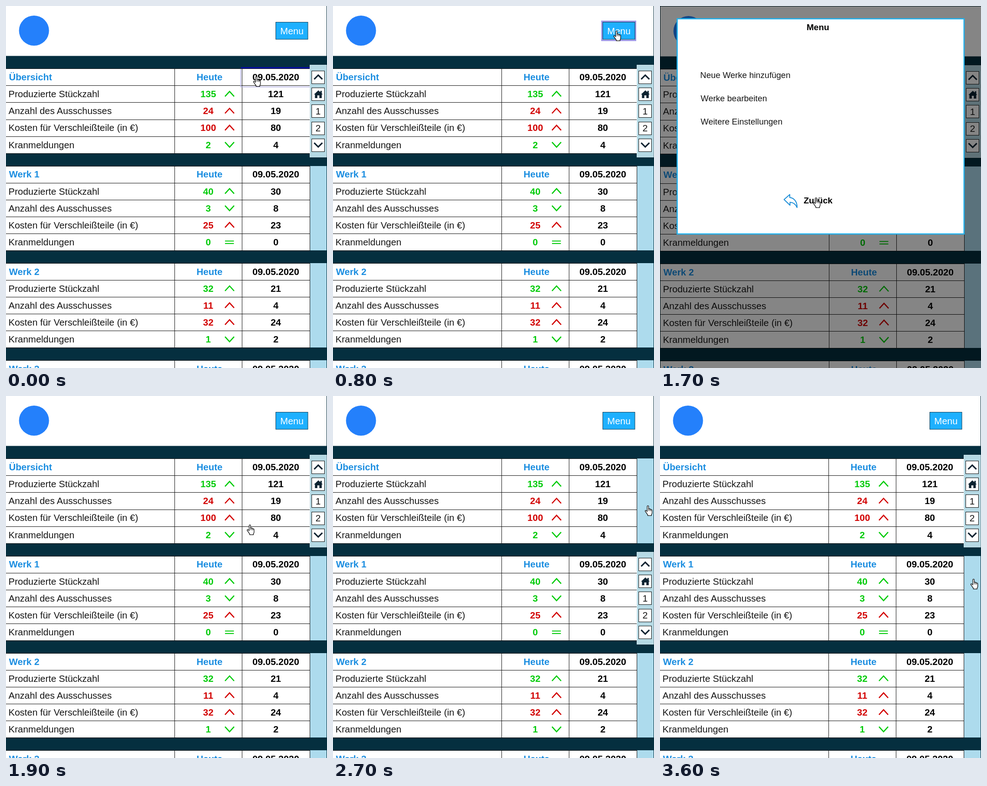
Recreate the animation shown at these times as an HTML page. Size 705 by 794 pixels, loop 3.7 s.

```html
<!DOCTYPE html>
<html lang="de">
<head>
<meta charset="utf-8">
<title>Produktionsübersicht</title>
<style>
html, body { margin: 0; width: 100%; height: 100%; overflow: hidden; background: #052f3f; }
svg { display: block; width: 705px; height: 794px; font: 20.5px "Liberation Sans", Arial, sans-serif; fill: #161616; }
.b { font-weight: bold; fill: #000; }
.mid { text-anchor: middle; }
.head { font-weight: bold; fill: #1a8de0; }
.good { font-weight: bold; fill: #00cb08; }
.bad { font-weight: bold; fill: #d20000; }
.icon { fill: none; stroke-width: 2.5; }
.equal { stroke-width: 2; }
.icon.good { stroke: #00cb08; }
.icon.bad { stroke: #d20000; }
.key { fill: #fff; stroke: #111; }
.arrow { fill: none; stroke: #0b2230; stroke-width: 3.2; }

#page, #nav, #cursor, #modal, .focus { animation: 3.7s step-end infinite; }
#page { animation-name: page; }
#modal { animation-name: modal; visibility: hidden; }
#nav { animation-name: nav; }
#cursor { animation-name: cursor; }
.focus { visibility: hidden; }
#dateFocus { animation-name: date; }
#menuFocus { animation-name: menu; }
#homeFocus { animation-name: home; }

@keyframes page {
  0%, 51.35%, 100% { transform: none; }
  24.32% { transform: translate(1px, 1px); }
}
@keyframes modal {
  0%, 51.35%, 100% { visibility: hidden; }
  24.32% { visibility: visible; }
}
@keyframes nav {
  0%, 89.18%, 100% { transform: none; }
  64.86% { transform: translateY(213px); }
}
@keyframes date {
  0% { visibility: visible; }
  8.1%, 100% { visibility: hidden; }
}
@keyframes menu {
  0%, 24.32%, 100% { visibility: hidden; }
  21.62% { visibility: visible; }
}
@keyframes home {
  0%, 89.18%, 100% { visibility: hidden; }
  86.48% { visibility: visible; }
}
/* The pointer advances in 100 ms steps */
@keyframes cursor {
  0% { transform: translate(543px, 154px); }
  5.4% { transform: translate(543px, 154px); animation-timing-function: steps(6); }
  21.62% { transform: translate(616px, 54px); }
  24.32% { transform: translate(616px, 54px); animation-timing-function: steps(4); }
  35.13% { transform: translate(315px, 388px); animation-timing-function: steps(2); }
  40.54% { transform: translate(336px, 420px); }
  45.94% { transform: translate(336px, 420px); animation-timing-function: steps(2); }
  51.35% { transform: translate(529px, 282px); animation-timing-function: steps(3); }
  59.45% { transform: translate(679px, 300px); }
  64.86% { transform: translate(679px, 300px); animation-timing-function: steps(3); }
  72.97% { transform: translate(685px, 240px); animation-timing-function: steps(4); }
  83.78% { transform: translate(676px, 417px); }
  89.18% { transform: translate(676px, 417px); animation-timing-function: steps(3); }
  97.29%, 100% { transform: translate(682px, 401px); }
}
</style>
</head>
<body>
<svg viewBox="0 0 705 794">
  <g id="page">
    <rect width="705" height="794" fill="#052f3f"/>
    <rect width="704" height="109.5" fill="#fff"/>
    <circle cx="61.5" cy="54" r="33" fill="#2480fb"/>
    <g id="menuFocus" class="focus">
      <rect x="590.5" y="33.5" width="74" height="42" fill="none" stroke="#a09be8" stroke-width="3"/>
    </g>
    <rect x="592.5" y="35.5" width="70.5" height="37.5" fill="#1eb0ff" stroke="#0b3850"/>
    <text class="mid" x="628" y="61.6" fill="#fff">Menu</text>

    <g id="tables"></g>

    <g id="dateFocus" class="focus">
      <path d="M516 135.5H667" stroke="#0010a0" stroke-width="3"/>
      <path d="M515.5 138V177.5H667" fill="none" stroke="#b4b2e6" stroke-width="1.6"/>
    </g>

    <g id="nav">
      <rect x="667.5" y="129.5" width="36.5" height="202" fill="#b5d9e4" stroke="#d3e6ec"/>
      <g id="keys"></g>
      <g id="homeFocus" class="focus">
        <rect x="671.5" y="179.5" width="28" height="28" fill="#c9c6f4" stroke="#555a78"/>
        <rect x="674" y="182" width="23" height="23" fill="#a5a2f2" stroke="#6a67d8" stroke-width="1.5"/>
      </g>
      <path fill="#0b2230" d="M676.5 194L686 185L690.5 189V186H693.5V191.8L695.5 194H693.5V202H688.2V196H683.8V202H678.5V194Z"/>
    </g>
  </g>

  <g id="modal">
    <rect width="705" height="794" opacity=".48" fill="#000"/>
    <rect x="37.75" y="28" width="630" height="472" fill="#fff" stroke="#1fb0ec" stroke-width="2.6"/>
    <g font-size="19" class="b">
      <text class="mid" x="346.8" y="53">Menu</text>
      <text x="315.5" y="433">Zurück</text>
    </g>
    <g font-size="18.5">
      <text x="88.3" y="158">Neue Werke hinzufügen</text>
      <text x="89.3" y="209">Werke bearbeiten</text>
      <text x="89.3" y="260">Weitere Einstellungen</text>
    </g>
    <path d="M272.5 424.5L285 413.5V420C295 421 301.5 430 301 442C297 434 293 431 285.5 430.5V437Z" fill="#fff" stroke="#1f8fd8" stroke-width="2" stroke-linejoin="round"/>
  </g>

  <g id="cursor">
    <path d="M5 13.5V2.3Q5 .7 6.6 .7Q8.2 .7 8.2 2.3V7.8Q9.6 6.6 11 8.2Q12.4 7.4 13.4 9.2Q15.8 8.8 15.8 11V16.5Q15.8 18.5 14.4 20V22.4H6.2V20.3Q4.4 18.6 3.3 16.4L.8 13Q.2 11.2 1.8 10.9Q3.2 10.9 5 13.5Z" fill="#fff" stroke="#111" stroke-width="1.3" stroke-linejoin="round"/>
    <path d="M8.2 7.5V12M11 8.5V12.3M13.4 9.5V12.5" stroke="#111"/>
  </g>
</svg>

<script>
const PITCH = 37.1, GAP = 213.3, TOP = 137.2;
const labels = ["Produzierte Stückzahl", "Anzahl des Ausschusses", "Kosten für Verschleißteile (in €)", "Kranmeldungen"];
// Each entry: today, earlier day
const sections = [
  ["Übersicht", [135, 121], [24, 19], [100, 80], [2, 4]],
  ["Werk 1", [40, 30], [3, 8], [25, 23], [0, 0]],
  ["Werk 2", [32, 21], [11, 4], [32, 24], [1, 2]],
  ["Werk 3"]
];

const text = (x, y, cls, str) => `<text x="${x}" y="${y + 7.3}" class="${cls}">${str}</text>`;
const rect = (x, y, w, h, fill) => `<rect x="${x}" y="${y}" width="${w}" height="${h}" fill="${fill}"/>`;
const chevron = (x, y, w, h, cls) => `<path class="${cls}" d="M${x - w} ${y + h}L${x} ${y - h}L${x + w} ${y + h}"/>`;
const equal = (x, y, cls) => `<path class="${cls} equal" d="M${x - 10} ${y - 2}h19.5m-19.5 5.5h19.5"/>`;

function row(label, [now, before], index, y) {
  // More output is good; more scrap, cost or alerts is bad
  const good = index === 0 ? now >= before : now <= before;
  const tone = good ? "good" : "bad";
  const icon = now === before
    ? equal(491, y, "icon " + tone)
    : chevron(491, y, 10, now > before ? 5.5 : -5.5, "icon " + tone);
  return text(5.5, y, "", label) + text(444.2, y, "mid " + tone, now) + icon + text(592.6, y, "mid b", before);
}

function section([title, ...rows], i) {
  const y0 = TOP + GAP * i;
  const top = Math.round(y0), height = Math.round(y0 + 5 * PITCH) - top;
  const mid = k => y0 + 18.6 + k * PITCH;
  let out = rect(0, top, 667, height, "#fff") + rect(668, top, 36, height, "#addbed");
  for (let k = 0; k < 6; k++) out += rect(0, Math.round(y0 + k * PITCH), 668, 1, "#111");
  for (const x of [370, 518, 667]) out += rect(x, top, 1, height, "#111");
  out += text(6.5, mid(0), "head", title) + text(447, mid(0), "mid head", "Heute") + text(592.6, mid(0), "mid b", "09.05.2020");
  rows.forEach((values, k) => out += row(labels[k], values, k, mid(k + 1)));
  return out;
}

function key(k) {
  const y = TOP + 19 + k * PITCH;
  const face = [
    chevron(685.8, y, 9, 4.5, "arrow"), "",
    text(685.5, y, "mid", 1), text(685.5, y, "mid", 2),
    chevron(685.8, y, 9, -4.5, "arrow")
  ][k];
  return `<rect class="key" x="671.5" y="${Math.round(y) - 13.5}" width="28" height="28"/>` + face;
}

document.getElementById("tables").innerHTML = sections.map(section).join("");
document.getElementById("keys").innerHTML = [0, 1, 2, 3, 4].map(key).join("");
</script>
</body>
</html>
```
